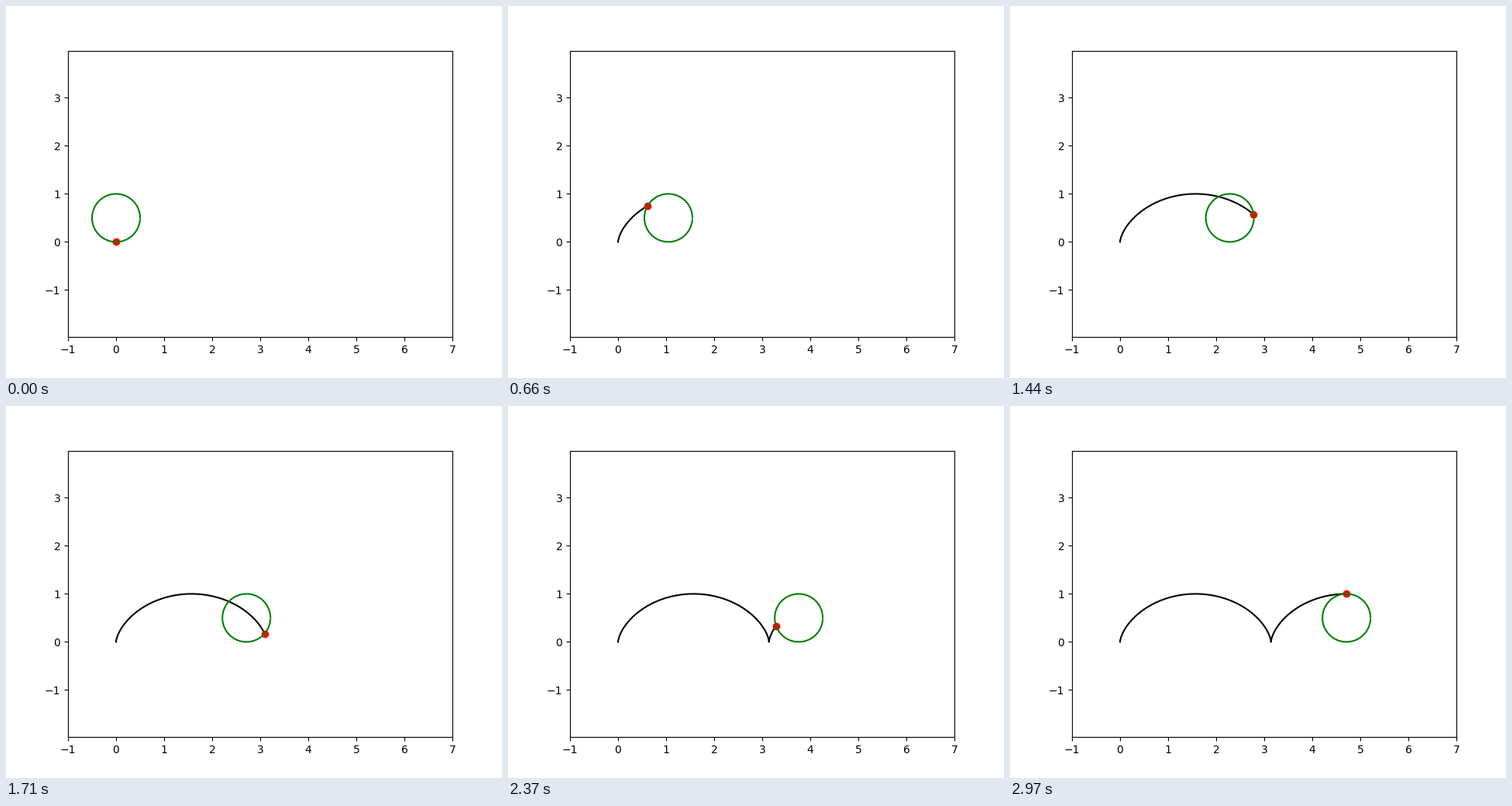
Recreate the animation shown at these times as a matplotlib script. Size 640x480 px, loop 3 s.

```python
import numpy as np
import matplotlib.pyplot as plt
from matplotlib.animation import FuncAnimation

FRAMES = 100
RADIUS = 0.5

# Rolling angle: one and a half turns over the loop.
theta = np.linspace(0, 3 * np.pi, FRAMES)
path_x = RADIUS * (theta - np.sin(theta))
path_y = RADIUS * (1 - np.cos(theta))

# The open end of the rim leaves a tiny notch on its right side.
rim = np.arange(0, 2 * np.pi, 0.1)
rim_x = RADIUS * np.cos(rim)
rim_y = RADIUS * (1 + np.sin(rim))

fig, ax = plt.subplots(figsize=(6.4, 4.8), dpi=100)
ax.set_aspect("equal", adjustable="datalim")
ax.set_xlim(-1, 7)
ax.set_ylim(-2, 4)

trail, = ax.plot([], [], "k", lw=1.5)
point, = ax.plot([], [], "ro", ms=6)
wheel, = ax.plot([], [], "g", lw=1.5)


def update(i):
    trail.set_data(path_x[:i + 1], path_y[:i + 1])
    point.set_data([path_x[i]], [path_y[i]])
    wheel.set_data(RADIUS * theta[i] + rim_x, rim_y)
    return trail, point, wheel


anim = FuncAnimation(fig, update, frames=FRAMES, interval=30,
                     init_func=lambda: update(0), repeat=True)
plt.show()
```
